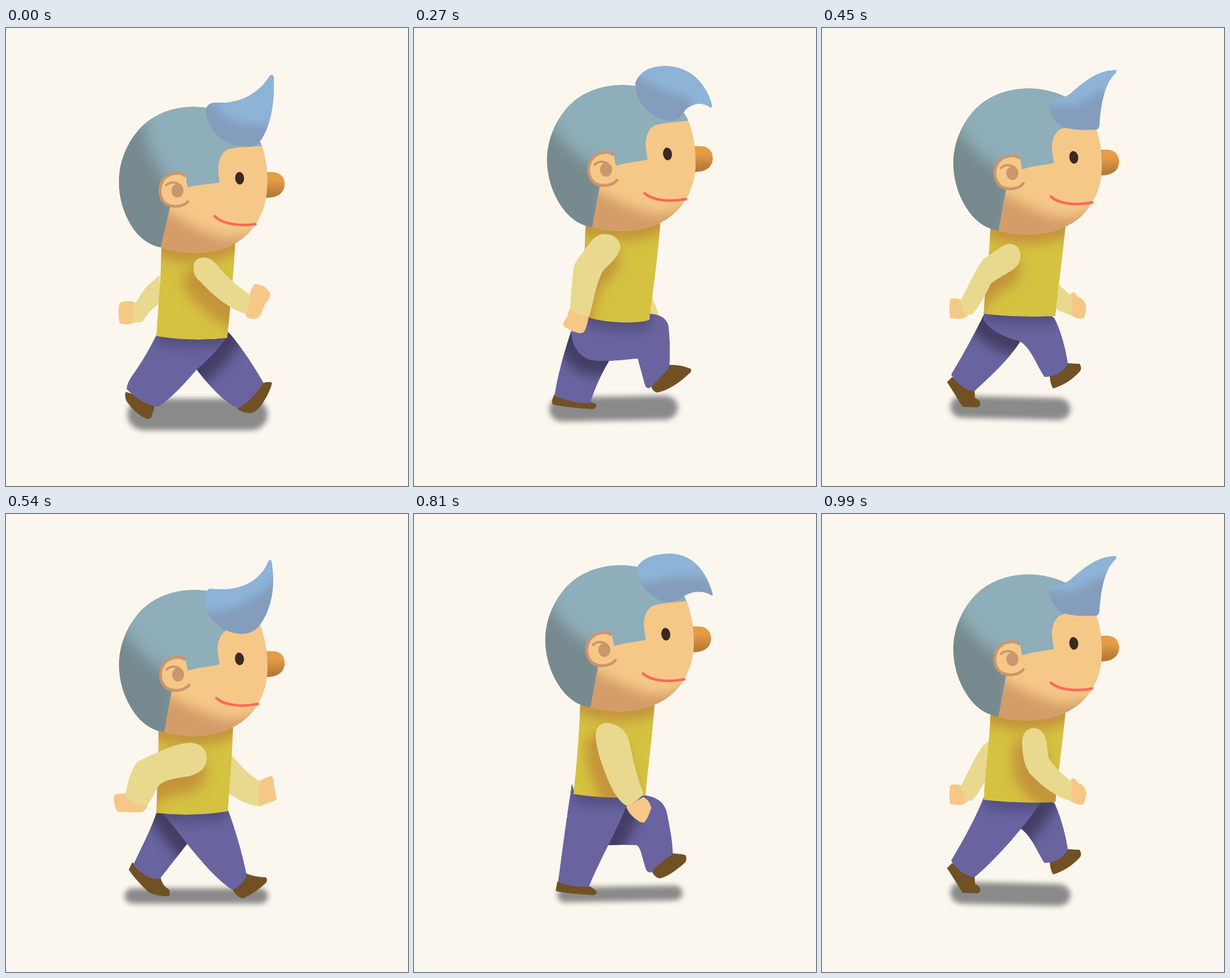
An HTML page for the animation above (1.08 s loop, 701x798 px).

```html
<!DOCTYPE html>
<html lang="en">
<head>
<meta charset="utf-8">
<title>Walk cycle</title>
<style>
html, body { margin: 0; width: 100%; height: 100%; overflow: hidden; background: #fbf7ee; }
svg { display: block; width: 100vw; height: 100vh; }
.pose { visibility: hidden; animation: show 1080ms step-end infinite; }
@keyframes show {
  0% { visibility: visible; }
  8.33333%, 100% { visibility: hidden; }
}
</style>
</head>
<body>
<svg id="stage" viewBox="0 0 701 798" xmlns="http://www.w3.org/2000/svg"></svg>
<script>
const skin = '#f5c887', sleeveCol = '#e8d98f', shirt = '#d5c241', pants = '#6964a0',
  pantsDark = '#423e64', shoeCol = '#715123', earCol = '#cb966d', ochre = '#c4943a';

// quiff: [outline, shaded side]
const quiffs = {
  tall: ['M348 142C352 130 362 129 372 130C410 131 442 112 459 84C462 80 467 80 467 86C469 120 465 158 450 186C444 199 436 206 425 207C395 210 352 190 348 142Z',
    'M335 115L367 131C374 162 410 172 475 169L475 225H335Z'],
  lean: ['M355 122C362 110 378 111 395 110C430 108 460 92 490 92Q496 94 492 99C482 125 472 155 460 170C450 185 444 190 430 191C398 192 354 165 355 122Z',
    'M345 112L372 113C385 143 430 155 485 146L480 210H345Z'],
  flop: ['M370 102C380 92 400 86 432 85C475 85 495 115 513 140Q515 144 511 143C498 140 486 148 473 160C464 168 458 173 445 173L400 171C378 155 367 125 370 102Z',
    'M355 80L394 88C405 112 430 135 495 137L520 150L500 195H355Z'],
  hook: ['M386 95C394 75 412 66 438 66C480 66 510 95 520 135Q519 142 515 138C500 128 485 132 473 143C465 157 458 162 446 162C415 160 385 130 386 95Z',
    'M375 80L398 87C420 105 450 115 480 120L490 175H375Z'],
  sweep: ['M389 98C400 84 425 74 448 62C478 50 510 58 533 76Q536 80 531 81C508 86 495 105 484 130C474 152 462 160 446 160C415 158 387 130 389 98Z',
    'M380 105L402 110C435 115 465 108 495 92L510 170H380Z'],
  flick: ['M394 125C402 127 420 123 432 115C455 95 480 73 512 73Q515 75 512 79C495 95 487 125 484 165Q484 177 478 177C460 178 435 178 420 172C405 165 395 145 394 125Z',
    'M380 130L400 134C430 139 455 132 475 114L505 108V195H380Z'],
  horn: ['M347 150Q348 130 356 130C408 136 443 117 457 83Q460 78 463 81C469 115 466 145 455 172C443 198 432 208 412 209C385 209 350 190 347 150Z',
    'M335 168L360 170C400 167 440 145 475 110L485 220H340Z'],
  cap: ['M389 92C400 75 420 69 448 69C490 70 512 105 521 140Q520 144 517 141C505 133 485 134 471 143C458 152 450 153 440 153C415 150 388 120 389 92Z',
    'M385 118L410 119C440 113 480 104 515 114L535 155L400 170Z']
};

// arms: [sleeve, hand, dx, dy]
const arms = {
  fore: ['M327 418C326 405 336 399 346 400C356 400 365 408 372 418C390 438 410 455 428 466L418 498C390 490 360 465 340 443C331 435 327 430 327 418Z',
    'M428 455L433 446Q455 448 461 464Q460 473 452 480L444 500Q436 512 420 504L415 495Z'],
  aft: ['M268 431C255 442 240 452 232 470L222 484V514L238 512C245 500 255 488 268 480Z',
    'M200 478Q215 473 226 479Q230 500 222 514Q210 519 198 514Q195 500 197 483Z'],
  dropFore: ['M321 405C321 392 331 386 342 386C355 387 362 397 366 410C372 432 384 450 400 468Q402 485 388 500C365 490 340 465 328 440C323 428 321 417 321 405Z',
    'M388 500L401 468Q418 470 424 484Q420 505 410 516Q398 517 386 500Z'],
  dropAft: ['M270 425L246 455L236 480L244 505L256 500L268 480Z',
    'M214 478Q228 474 238 480L244 504Q238 513 228 513L214 511Q210 495 214 478Z'],
  hang: ['M311 400C314 380 322 374 334 373C348 373 355 382 354 395C352 420 350 440 350 455C352 475 360 490 367 505L366 518Q355 521 340 518C325 500 312 465 309 435C308 420 309 410 311 400Z',
    'M338 515L366 516L371 508Q384 513 388 532Q387 538 380 539Q360 543 345 540Q339 530 338 515Z'],
  back: ['M298 386C312 366 320 358 334 359C350 360 360 370 360 383C357 397 345 408 332 420C318 440 315 470 306 501Q290 504 272 488C274 460 276 435 279 415C283 403 292 395 298 386Z',
    'M272 488Q290 501 305 501Q302 520 297 529Q293 533 285 531Q270 527 260 518Q261 510 266 505Z'],
  peek: ['M415 468L427 500L410 502Z', ''],
  swing: ['M290 390C305 376 318 366 330 366C345 366 354 376 353 390C351 404 338 412 328 422C312 436 307 450 302 465C297 480 290 495 283 503Q265 503 254 484C260 455 268 425 278 405C281 400 285 394 290 390Z',
    'M254 484Q265 501 283 503Q277 520 268 523Q250 520 240 508Q242 495 254 484Z'],
  peekFore: ['M414 455L434 482L428 502L409 498Z',
    'M428 480Q445 480 448 495Q446 510 436 512L424 505Z'],
  rear: ['M281 403C300 390 315 378 326 376C340 376 347 386 346 400C344 414 335 420 325 426C310 435 300 440 294 446C285 465 275 485 262 499L250 501L241 476C255 450 265 425 281 403Z',
    'M224 472Q235 469 243 474L254 500Q250 506 240 507L224 506Q220 490 224 472Z'],
  front: ['M349 402C348 384 356 374 368 373C382 373 390 384 392 400L395 425C405 440 420 455 435 466V500C410 495 385 475 365 455C352 440 350 420 349 402Z',
    'M433 466Q434 460 441 461L446 468Q458 472 461 485Q460 500 456 506Q445 508 433 500Z'],
  wideRear: ['M230 431C260 418 285 403 315 399C337 397 350 408 350 426C349 445 335 453 318 457C290 461 272 465 265 475C258 490 252 500 246 507Q225 510 208 493C212 465 218 445 230 431Z',
    'M192 488L210 487Q225 506 247 507Q244 518 234 520L194 519Q187 505 188 492Z'],
  wideFront: ['M390 416C408 437 422 453 441 465V509Q415 507 385 484Z',
    'M441 465L462 456Q467 458 467 470Q470 485 472 498L441 510Z'],
  ahead: ['M317 385C317 370 326 364 337 364C355 365 371 378 375 395C382 430 390 460 400 487Q395 497 372 509Q352 500 335 455C325 430 317 405 317 385Z',
    'M370 510L400 493Q410 498 414 512Q408 530 402 537Q397 539 390 534Q375 524 370 510Z'],
  rise: ['M333 390C333 374 342 367 354 367C370 368 380 380 384 397C390 425 402 452 418 472Q415 490 398 501C375 490 355 460 343 432C337 415 333 405 333 390Z',
    'M398 501L418 474Q432 478 438 494Q432 512 422 520Q408 517 398 501Z'],
  riseAft: ['M292 400L268 440L254 476L266 498L286 470Z',
    'M240 475L255 473L267 496Q260 507 250 508L237 504Q235 488 240 475Z']
};
arms.low = [...arms.back, -29, 18];

// legs: [trouser, shoe]
const frontShoe = 'M429 584Q440 585 449 585Q454 592 450 598Q430 620 403 628Q398 620 397 606Q405 592 429 584Z',
  rearShoe = 'M227 608Q245 618 266 631L267 645Q276 648 276 655Q275 661 270 661L245 660Q230 635 218 617Z',
  flatShoe = 'M338 655Q370 664 398 655Q412 660 412 668Q412 674 408 676L340 676Q336 668 338 655Z',
  midShoe = 'M283 657Q310 662 344 662L350 668Q351 674 349 677Q315 676 283 674Q280 668 283 657Z',
  pushShoe = 'M235 620Q260 638 288 645Q298 650 298 657Q296 663 290 663Q255 662 230 640Z';
const legs = {
  longRear: ['M263 533L386 536C375 556 350 580 333 595C315 615 290 645 265 660Q235 655 210 629Q211 620 217 610C235 585 250 560 263 533Z',
    'M209 634Q235 642 260 656L254 678Q250 682 245 681Q225 672 210 650Q206 640 209 634Z'],
  longFront: ['M330 592L388 530C410 555 430 585 449 618Q430 648 405 663C380 652 355 625 330 592Z',
    'M447 619Q458 615 464 618Q462 630 450 650Q438 670 425 671Q410 670 403 663Q422 635 447 619Z'],
  lift: ['M264 512L385 515C390 550 385 575 368 592C345 612 320 630 293 645Q272 635 266 612C285 598 300 585 300 570Q270 550 264 512Z',
    'M266 612Q275 630 292 643Q285 665 276 672Q265 670 260 652L254 620Z'],
  plant: ['M320 570L382 515C395 560 400 610 398 655Q370 668 338 658Q328 615 320 570Z', flatShoe],
  plantNear: ['M264 512L385 515C395 560 400 610 398 655Q370 668 338 658Q325 600 264 512Z', flatShoe],
  pass: ['M267 490L378 497C395 530 412 555 417 580Q419 595 412 602C395 620 375 628 350 640Q335 632 327 604L339 593C320 575 300 568 285 550Q264 530 267 490Z',
    'M318 608L327 602Q340 620 353 638Q350 655 345 663Q335 662 330 648Q320 625 314 612Z'],
  stand: ['M289 550L340 580L345 640L347 663Q315 664 284 658Q288 610 289 550Z', midShoe],
  standNear: ['M267 490L378 497C370 550 352 600 347 663Q315 664 284 658Q288 610 284 560Q266 530 267 490Z', midShoe],
  knee: ['M274 528L300 498L413 498Q440 500 444 520C447 550 447 575 445 592Q430 610 410 628Q404 628 402 620L390 576C360 579 325 583 305 578Q275 565 274 528Z',
    'M445 587Q465 586 483 594Q484 599 480 602Q450 630 425 635Q418 636 413 624Q422 598 445 587Z'],
  trail: ['M274 528Q280 565 342 577C325 605 315 630 307 654Q270 653 245 640C250 605 262 565 274 528Z',
    'M245 638Q275 645 307 651L317 655Q319 660 314 664Q275 663 242 656Q238 652 245 638Z'],
  reach: ['M282 495H400Q428 498 434 525C440 555 442 575 440 592Q422 612 402 620Q396 610 388 585Q375 565 350 562Q300 560 282 495Z',
    'M438 588Q455 586 469 590Q471 597 466 602Q440 626 415 633Q409 625 408 615Q415 595 438 588Z'],
  push: ['M280 500Q300 555 346 560C325 595 302 625 288 648Q260 645 234 622C250 590 265 550 280 500Z', pushShoe],
  pushNear: ['M280 485L382 498C360 550 315 610 288 648Q260 645 234 622C250 580 268 535 280 485Z', pushShoe],
  step: ['M282 494L370 497Q395 495 405 505C418 530 425 560 429 585Q415 608 388 608C375 590 365 558 345 546Q300 535 282 510Z', frontShoe],
  stepFar: ['M343 546L380 498L405 503C418 530 425 560 429 585Q415 608 388 608C375 590 365 558 343 546Z', frontShoe],
  toe: ['M282 500L347 544C325 580 290 610 266 633Q242 630 225 604C245 570 265 535 282 500Z', rearShoe],
  toeNear: ['M282 494L384 499C350 550 300 605 266 633Q242 630 225 604C245 570 265 535 282 494Z', rearShoe],
  heel: ['M268 515H387C400 550 412 590 420 630Q412 648 395 655C370 640 340 605 316 575C300 555 285 535 268 515Z',
    'M418 626Q435 633 453 633Q457 638 453 643Q435 660 415 669Q405 671 394 653Q405 640 418 626Z'],
  leave: ['M264 516L285 520L318 572C300 595 285 615 268 636Q245 638 222 611C236 580 253 550 264 516Z',
    'M220 607Q240 622 269 631Q272 648 284 654Q287 660 284 666Q265 666 250 660Q228 640 214 620Z'],
  post: ['M275 469L280 484L370 490V510C355 550 325 600 305 650Q275 650 251 642C258 590 265 535 273 485Z',
    'M250 640Q280 645 307 649Q319 656 319 660Q316 664 312 664Q275 662 247 657Z'],
  kneeFar: ['M360 490H404Q435 495 441 520C447 550 452 575 451 593Q430 605 413 625Q406 625 404 618C398 600 395 580 388 577Q365 576 338 577Z',
    'M450 591Q462 592 473 594Q477 600 473 607Q445 632 428 635Q418 632 414 621Q425 598 450 591Z']
};

const torsos = {
  low: 'M271 375L400 366C398 430 390 490 386 540Q325 547 262 537C265 490 270 440 271 375Z',
  dip: 'M271 355L401 348L385 519Q320 527 261 515Z',
  mid: 'M272 333L402 328C399 390 390 450 383 499Q320 506 259 493C264 445 270 400 272 333Z',
  lead: 'M300 335L430 332C426 400 416 460 411 508Q400 514 360 513Q315 511 295 500C298 450 296 380 300 335Z',
  glide: 'M297 335L427 332L409 502Q340 510 286 497Z',
  settle: 'M294 343L425 340C420 400 412 450 407 502Q340 505 282 498C284 450 292 400 294 343Z',
  land: 'M266 370L396 364C395 420 390 470 387 518Q325 528 262 521C264 470 266 420 266 370Z',
  high: 'M290 325L420 325C416 390 408 440 404 491Q340 498 278 488C283 440 288 390 290 325Z'
};

// head [dx, dy, tilt], quiff, torso, near leg, far leg, near arm, far arm, ground [x, y, w, h, tilt]
const poses = [
  [[0, 5, 3], 'tall', 'low', 'longRear', 'longFront', 'fore', 'aft', [212, 646, 244, 55, 0]],
  [[3, -14, 3], 'lean', 'dip', 'lift', 'plant', 'dropFore', 'dropAft', [222, 654, 215, 48, 0]],
  [[5, -35, 4], 'flop', 'mid', 'pass', 'stand', 'hang', '', [231, 659, 186, 42, 1]],
  [[35, -33, 0], 'hook', 'lead', 'knee', 'trail', 'back', 'peek', [236, 642, 224, 42, -1]],
  [[34, -38, 0], 'sweep', 'glide', 'reach', 'push', 'swing', 'peekFore', [230, 643, 216, 40, 0]],
  [[32, -27, 0], 'flick', 'settle', 'step', 'toe', 'rear', 'front', [224, 643, 209, 38, 1.3]],
  [[0, 0, 0], 'horn', 'land', 'heel', 'leave', 'wideRear', 'wideFront', [207, 652, 250, 27, 0]],
  [[3, -14, 0], 'lean', 'dip', 'plantNear', 'lift', 'low', '', [218, 656, 220, 34, 0]],
  [[5, -37, 0], 'flop', 'mid', 'standNear', 'pass', 'hang', '', [231, 660, 188, 34, 0]],
  [[32, -43, 0], 'cap', 'high', 'post', 'kneeFar', 'ahead', '', [250, 649, 218, 26, -1]],
  [[34, -38, 0], 'sweep', 'glide', 'pushNear', 'reach', 'rise', 'riseAft', [238, 645, 212, 34, 0]],
  [[32, -27, 0], 'flick', 'settle', 'toeNear', 'stepFar', 'front', 'rear', [224, 643, 209, 38, 1.3]]
];

const skull = 'M276 380C258 378 239 367 225 348C206 322 197 292 197 262C197 235 207 203 226 179C249 148 287 132 328 132C380 132 431 160 444 196C452 220 456 240 456 268C456 310 436 352 395 372C360 390 310 390 276 380Z',
  face = 'M276 380L289 308L290 285L317 273C335 267 355 266 372 262C371 252 368 240 369 230C371 214 379 203 388 202C405 197 425 197 446 194L480 190V400H270Z';

const path = (d, fill, more = '') => `<path d="${d}" fill="${fill}" ${more}/>`;
const line = (d, stroke, w) => path(d, 'none', `stroke="${stroke}" stroke-width="${w}" stroke-linecap="round"`);
const blur = n => `filter="url(#b${n})"`;
const clip = (id, d) => `<clipPath id="${id}"><path d="${d}"/></clipPath>`;
const inside = (id, body) => `<g clip-path="url(#${id})">${body}</g>`;

function headArt(tilt) {
  const side = tilt
    ? 'M170 130L234 160Q242 225 290 272L310 410H170Z'
    : 'M170 175L207 205Q235 255 300 285L290 410H170Z';
  return path('M450 239H466C480 240 486 249 486 260C486 274 475 284 455 284Z', 'url(#nose)') +
    inside('skull', path(skull, '#8eaeb9') + path(side, '#76898e', blur(13)) +
      inside('face', path(face, skin) +
        path('M255 300Q330 345 380 357Q410 362 445 343L450 410H250Z', '#d49c69', blur(10)))) +
    path('M313 253C306 248 292 249 283 254C266 264 265 291 280 303C294 311 312 307 319 297L317 273Z', skin) +
    line('M311 253C306 248 292 249 283 254C266 264 265 291 280 303C294 311 312 307 319 298', earCol, 5) +
    line('M280 271C288 263 303 265 307 275', earCol, 4) +
    `<ellipse cx="300" cy="280" rx="10.5" ry="12" fill="${earCol}"/>` +
    '<ellipse cx="407" cy="252.5" rx="7.8" ry="11" fill="#3a2a1f" transform="rotate(-6 407 252)"/>' +
    line('M367 321C380 333 410 337 439 331', '#ff6759', 4.5);
}

function arm(name) {
  if (!name) return '';
  const [sleeve, hand, dx = 0, dy = 0] = arms[name];
  return `<g transform="translate(${dx} ${dy})">${path(hand, skin)}${path(sleeve, sleeveCol)}</g>`;
}

function armShade(name) {
  const [sleeve, , dx = 0, dy = 0] = arms[name];
  return `<g transform="translate(${dx - 9} ${dy + 23})">${path(sleeve, ochre, `stroke="${ochre}" stroke-width="16" ${blur(10)}`)}</g>`;
}

function draw([[dx, dy, tilt], quiff, torso, near, far, nearArm, farArm, [x, y, w, h, turn]], i) {
  const [nearLeg, nearShoe] = legs[near], [farLeg, farShoe] = legs[far];
  const [tuft, tuftShade] = quiffs[quiff], body = torsos[torso];
  const place = `translate(${dx} ${dy}) rotate(${tilt} 327 260)`;
  const id = s => s + i;
  const hem = path(body, pantsDark, `transform="translate(0 14)" opacity=".55" ${blur(10)}`);
  return `<g class="pose" style="animation-delay:${i * 90 - 1080}ms">` +
    clip(id('t'), body) + clip(id('n'), nearLeg) + clip(id('f'), farLeg) + clip(id('q'), tuft) +
    `<rect x="${x}" y="${y}" width="${w}" height="${h}" rx="${h * .55}" ry="${h * .48}" fill="#8a8a8a" transform="rotate(${turn} ${x + w / 2} ${y + h / 2})" ${blur(5)}/>` +
    arm(farArm) +
    path(farShoe, shoeCol) +
    inside(id('f'), path(farLeg, pants) +
      path(nearLeg, pantsDark, `stroke="${pantsDark}" stroke-width="52" ${blur(10)}`)) +
    path(nearShoe, shoeCol) +
    inside(id('n'), path(nearLeg, pants) + hem) +
    inside(id('t'), path(body, shirt) + armShade(nearArm) +
      `<g transform="${place}">${path(skull, ochre, `transform="translate(0 17)" ${blur(10)}`)}</g>`) +
    `<g transform="${place}">${headArt(tilt)}</g>` +
    inside(id('q'), path(tuft, '#8db3d7') + path(tuftShade, '#849dbc', blur(7))) +
    arm(nearArm) + '</g>';
}

const blurs = [5, 7, 10, 13].map(n =>
  `<filter id="b${n}" x="-30%" y="-60%" width="160%" height="220%" color-interpolation-filters="sRGB"><feGaussianBlur stdDeviation="${n}"/></filter>`);

document.getElementById('stage').innerHTML =
  `<defs>${blurs.join('')}${clip('skull', skull)}${clip('face', face)}
  <linearGradient id="nose" x1="0" y1="0" x2="0" y2="1">
    <stop offset=".3" stop-color="#e69c47"/><stop offset=".85" stop-color="#b87c37"/>
  </linearGradient></defs>` + poses.map(draw).join('');
</script>
</body>
</html>
```
